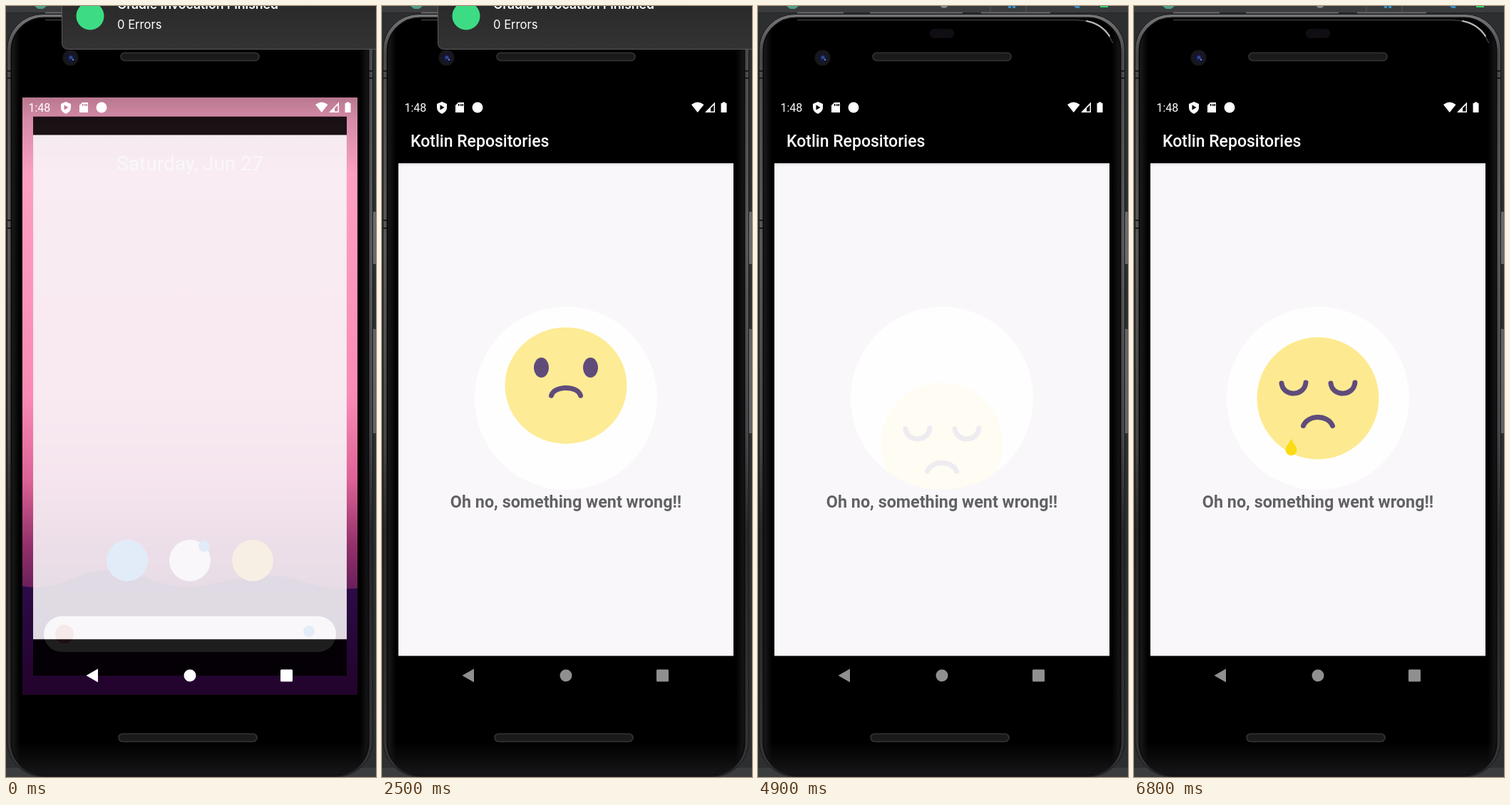
These frames come from a looping animation (519x1079 px, 6900 ms). An HTML page:

```html
<!DOCTYPE html>
<html lang="en">
<head>
<meta charset="utf-8">
<title>Error screen</title>
<style>
html, body { margin: 0; width: 100%; height: 100%; overflow: hidden; background: #2d2e2f; }
svg { display: block; width: 519px; height: 1079px; }
text { font-family: Roboto, sans-serif; }
.mac { font-family: Inter, sans-serif; fill: #fff; }
</style>
</head>
<body>
<svg viewBox="0 0 519 1079" xmlns="http://www.w3.org/2000/svg">
  <defs>
    <linearGradient id="metal" x1="0" y1="0" x2="0" y2="1">
      <stop offset="0" stop-color="#77777a"/><stop offset=".05" stop-color="#4a4a4c"/>
      <stop offset=".3" stop-color="#58585a"/><stop offset=".55" stop-color="#464648"/>
      <stop offset=".68" stop-color="#272729"/><stop offset="1" stop-color="#343436"/>
    </linearGradient>
    <linearGradient id="rim" x1="0" y1="0" x2="1" y2="0">
      <stop offset="0" stop-color="#1c1c1e"/><stop offset=".024" stop-color="#000"/>
      <stop offset=".976" stop-color="#000"/><stop offset="1" stop-color="#19191b"/>
    </linearGradient>
    <linearGradient id="chin" x1="0" y1="0" x2="0" y2="1">
      <stop offset="0" stop-color="#161618" stop-opacity="0"/><stop offset="1" stop-color="#161618"/>
    </linearGradient>
    <linearGradient id="button" x1="0" y1="0" x2="1" y2="0">
      <stop offset="0" stop-color="#8a8a8c"/><stop offset="1" stop-color="#525254"/>
    </linearGradient>
    <linearGradient id="sky" x1="0" y1="0" x2="0" y2="1">
      <stop offset="0" stop-color="#b8788f"/><stop offset=".04" stop-color="#d78ca9"/>
      <stop offset=".13" stop-color="#fd9fc1"/><stop offset=".5" stop-color="#fa8ab5"/>
      <stop offset=".64" stop-color="#dd6296"/><stop offset=".75" stop-color="#93306b"/>
      <stop offset=".82" stop-color="#6b205c"/>
    </linearGradient>
    <linearGradient id="hill" x1="0" y1="0" x2="0" y2="1">
      <stop offset="0" stop-color="#2e0c4b"/><stop offset="1" stop-color="#22032b"/>
    </linearGradient>
    <linearGradient id="toast" x1="0" y1="0" x2="0" y2="1">
      <stop offset="0" stop-color="#262627"/><stop offset="1" stop-color="#333334"/>
    </linearGradient>
    <linearGradient id="shade" x1="0" y1="0" x2="0" y2="1">
      <stop offset="0" stop-color="#dedce0"/><stop offset="1" stop-color="#f9f7fa"/>
    </linearGradient>
    <clipPath id="disc"><circle cx="258" cy="549" r="128"/></clipPath>
  </defs>

  <!-- desktop behind the phone -->
  <rect width="519" height="1079" fill="#2d2e2f"/>
  <rect width="519" height="10" fill="#3a3c3e"/>
  <rect y="1066" width="519" height="13" fill="#3a3c3e"/>
  <path d="M0 9.5H519" stroke="#232426"/>
  <path d="M40 0h17l-5 4h-7z" fill="#4f9f87"/>
  <circle cx="261" cy="-3" r="6" fill="#8b8c8e"/>
  <path d="M351 0h4v3h-4zM357 0h4v3h-4zM443 0h8v3h-5z" fill="#3590cc"/>
  <path d="M480 0h11v2h-11z" fill="#35d16a"/>
  <path d="M326 0v9M376 0v9" stroke="#55575a"/>

  <!-- phone body -->
  <g fill="url(#button)">
    <rect x="512" y="288" width="9" height="73" rx="3"/>
    <rect x="511" y="452" width="9" height="146" rx="3"/>
  </g>
  <path d="M55 9.5H120M157 9.5H287M313 9.5H410" stroke="#68686a" stroke-width="2"/>
  <rect x="1.5" y="11.5" width="513" height="1067" rx="50" fill="url(#metal)" stroke="#171718"/>
  <path d="M2 91h8M2 101h8M2 300h8M2 311h8M506 91h8M506 101h8" stroke="#1b1b1c" stroke-width="2"/>
  <rect x="7.5" y="16.5" width="501" height="1060" rx="46" fill="url(#rim)" stroke="#0b0b0c" stroke-width="2"/>
  <path d="M8 1030Q9 1076 54 1076H462Q507 1076 508 1030Z" fill="url(#chin)"/>
  <path d="M55 19.5H445Q483 20 498 52" fill="none" stroke="#3c3c3f" stroke-width="1.5"/>
  <path d="M461 21Q482 25 493 42" fill="none" stroke="#bdbdc0" stroke-width="2" stroke-linecap="round"/>
  <rect x="241" y="32" width="34" height="13" rx="6" fill="#100d13"/>
  <circle cx="90.500" cy="72.500" r="11" fill="#17171d"/>
  <circle cx="91" cy="73" r="6" fill="#14183a"/>
  <circle cx="91" cy="72" r="2.500" fill="#33468c"/>
  <circle cx="94" cy="75" r="1.200" fill="#7284bd"/>
  <g fill="#1b1a1b" stroke="#363434" stroke-width="1.5">
    <rect x="161" y="65.500" width="194" height="11" rx="5.500"/>
    <rect x="158" y="1018.500" width="194" height="11" rx="5.500"/>
  </g>

  <!-- launcher -->
  <g id="home">
    <rect x="23" y="128" width="470" height="836" fill="url(#sky)"/>
    <path d="M23 812Q60 818 100 798Q155 778 205 804Q255 820 300 806Q360 792 400 800Q450 818 493 815V964H23Z" fill="url(#hill)"/>
    <text x="258" y="230" font-size="28" text-anchor="middle" fill="#fff">Saturday, Jun 27</text>
    <circle cx="170" cy="776" r="29" fill="#3da4ee"/>
    <circle cx="258" cy="776" r="29" fill="#fff"/>
    <circle cx="278" cy="756" r="8" fill="#3da4ee"/>
    <circle cx="346" cy="776" r="29" fill="#e9bd42"/>
    <rect x="53" y="854" width="410" height="50" rx="25" fill="#fff"/>
    <circle cx="82" cy="879" r="13" fill="#dc8a72"/>
    <circle cx="425" cy="875" r="8" fill="#4d9de9"/>
  </g>

  <!-- app -->
  <g id="app">
    <rect x="23" y="128" width="470" height="836"/>
    <rect x="23" y="155.5" width="470" height="754" fill="#f9f7fa"/>
    <g id="toolbar">
      <rect x="23" y="155" width="470" height="65"/>
      <rect x="23" y="220" width="470" height="4" fill="url(#shade)"/>
      <text x="40" y="196.500" font-size="23" font-weight="500" fill="#fff">Kotlin Repositories</text>
    </g>
    <g id="error">
      <circle cx="258" cy="549" r="128" fill="#fffeff"/>
      <text x="258" y="701.500" font-size="23.350" font-weight="700" text-anchor="middle" fill="#626164">Oh no, something went wrong!!</text>
      <g clip-path="url(#disc)">
        <g id="face">
          <ellipse id="head" rx="85.500" fill="#fdea90"/>
          <g id="features">
            <g id="openEyes" fill="#5f4c7b">
              <ellipse cx="-34.500" rx="10.500"/>
              <ellipse cx="34.500" rx="10.500"/>
            </g>
            <g fill="none" stroke="#5f4c7b" stroke-width="7" stroke-linecap="round">
              <path id="closedEyes" d="M-51-21C-49-2-19-2-17-22M18-21C20-2 50-2 52-22"/>
              <path id="mouth"/>
              <circle id="gasp" r="9.500" cy="-4" stroke-width="5"/>
            </g>
          </g>
        </g>
      </g>
      <path id="tear" d="M0-24C2-17 8-13 8-8A8 8 0 0 1-8-8C-8-13-2-17 0-24Z" fill="#fbdc12"/>
    </g>
  </g>

  <!-- system bars -->
  <g fill="#fff">
    <text x="31.500" y="148" font-size="16">1:48</text>
    <path fill-rule="evenodd" d="M84 134l7 3v5q0 6-7 9q-7-3-7-9v-5zM81.500 138.500v7l6-3.500z"/>
    <path fill-rule="evenodd" d="M107 135h8v14h-12v-10zM107 137v3h1.500v-3zM110 137v3h1.500v-3zM112.500 137v3h1.500v-3z"/>
    <circle cx="134" cy="142" r="7.500"/>
    <path d="M434 138Q442.500 131 451.500 138L442.700 149Z"/>
    <path fill-rule="evenodd" d="M467 134.500V149H453ZM465.500 138.500L461 143V147.500H465.500Z"/>
    <path d="M477.500 134.500h4v1.500h2v13h-8v-13h2z"/>
  </g>
  <g id="nav">
    <path d="M112.500 937L129 927.500V946.500Z"/>
    <circle cx="258" cy="937" r="8.500"/>
    <rect x="385" y="928.500" width="17" height="17" rx="1.500"/>
  </g>

  <!-- desktop notification -->
  <g id="notice">
    <rect x="78.500" y="-30" width="470" height="90.500" rx="8" fill="url(#toast)" stroke="#59595b"/>
    <circle cx="118" cy="14" r="19.500" fill="#3ddc84"/>
    <text class="mac" x="156" y="3.500" font-size="17.600" font-weight="600">Gradle Invocation Finished</text>
    <text class="mac" x="156" y="32" font-size="16.600">0 Errors</text>
  </g>
</svg>
<script>
const LOOP = 6900, STEP = 100;
const FACE_START = 2150, FACE_LOOP = 3000;
const el = {};
document.querySelectorAll('svg > g[id], #app [id]').forEach(n => el[n.id] = n);

const set = (node, attrs) => {
  for (const name in attrs) node.setAttribute(name, attrs[name]);
};
const show = (node, visible) => set(node, { visibility: visible ? 'inherit' : 'hidden' });

// Smooth interpolation through [time, value] pairs.
function key(t, ...stops) {
  if (t <= stops[0][0]) return stops[0][1];
  for (let i = 1; i < stops.length; i++) {
    const [t0, v0] = stops[i - 1], [t1, v1] = stops[i];
    if (t <= t1) {
      const p = (t - t0) / (t1 - t0);
      return v0 + (v1 - v0) * p * p * (3 - 2 * p);
    }
  }
  return stops[stops.length - 1][1];
}

function drawFace(c) {
  const y = key(c, [0, 645], [50, 630], [250, 525], [550, 549], [2350, 549], [2950, 635]);
  const fadeOut = key(c, [2350, 1], [2850, 0]);
  const down = key(c, [250, 0], [550, 1]);
  const lids = key(c, [350, 14], [500, 1]);
  set(el.face, { transform: `translate(258 ${y})`, opacity: fadeOut });
  set(el.head, {
    ry: key(c, [250, 80], [550, 85.5]),
    opacity: key(c, [0, 0], [50, .03], [250, .8], [400, 1])
  });
  set(el.features, { opacity: key(c, [0, 0], [50, .08], [230, 1]) });

  for (const eye of el.openEyes.children) {
    set(eye, { cy: key(c, [50, -23], [250, -29], [550, -14]), ry: lids });
  }
  show(el.openEyes, c < 500);
  show(el.closedEyes, c >= 500);

  const base = 5.5 + 33 * down, top = base - 14 - 2 * down, bend = 18 - 4 * down;
  set(el.mouth, { d: `M-20.500 ${base}C${-bend} ${top} ${bend} ${top} 20.500 ${base}` });
  show(el.mouth, c >= 120);
  show(el.gasp, c < 120);

  const drop = key(c, [1350, 0], [1500, .8], [1650, 1], [1950, .34], [2100, 0]);
  const fall = key(c, [1350, 552], [1650, 629], [1950, 628]);
  set(el.tear, { transform: `translate(220.500 ${fall}) scale(${drop})` });
}

function render(now) {
  const t = Math.floor(now % LOOP / STEP) * STEP;
  const left = Math.max(0, 1 - t / 200);
  const scale = 1 - .064 * left * left;

  show(el.home, t < 200);
  set(el.app, {
    transform: `translate(258 546) scale(${scale}) translate(-258 -546)`,
    opacity: t < 100 ? .88 : 1
  });
  show(el.toolbar, t >= 1100);
  show(el.error, t >= 2100);
  drawFace((t - FACE_START + FACE_LOOP) % FACE_LOOP);

  const grey = Math.round(key(t, [600, 255], [900, 206], [1000, 206], [1300, 143]));
  set(el.nav, { fill: `rgb(${grey},${grey},${grey})` });
  set(el.notice, { transform: `translate(${key(t, [3420, 0], [3950, 450])} 0)` });
}

function frame(now) {
  render(now);
  requestAnimationFrame(frame);
}
render(0);
requestAnimationFrame(frame);
</script>
</body>
</html>
```
